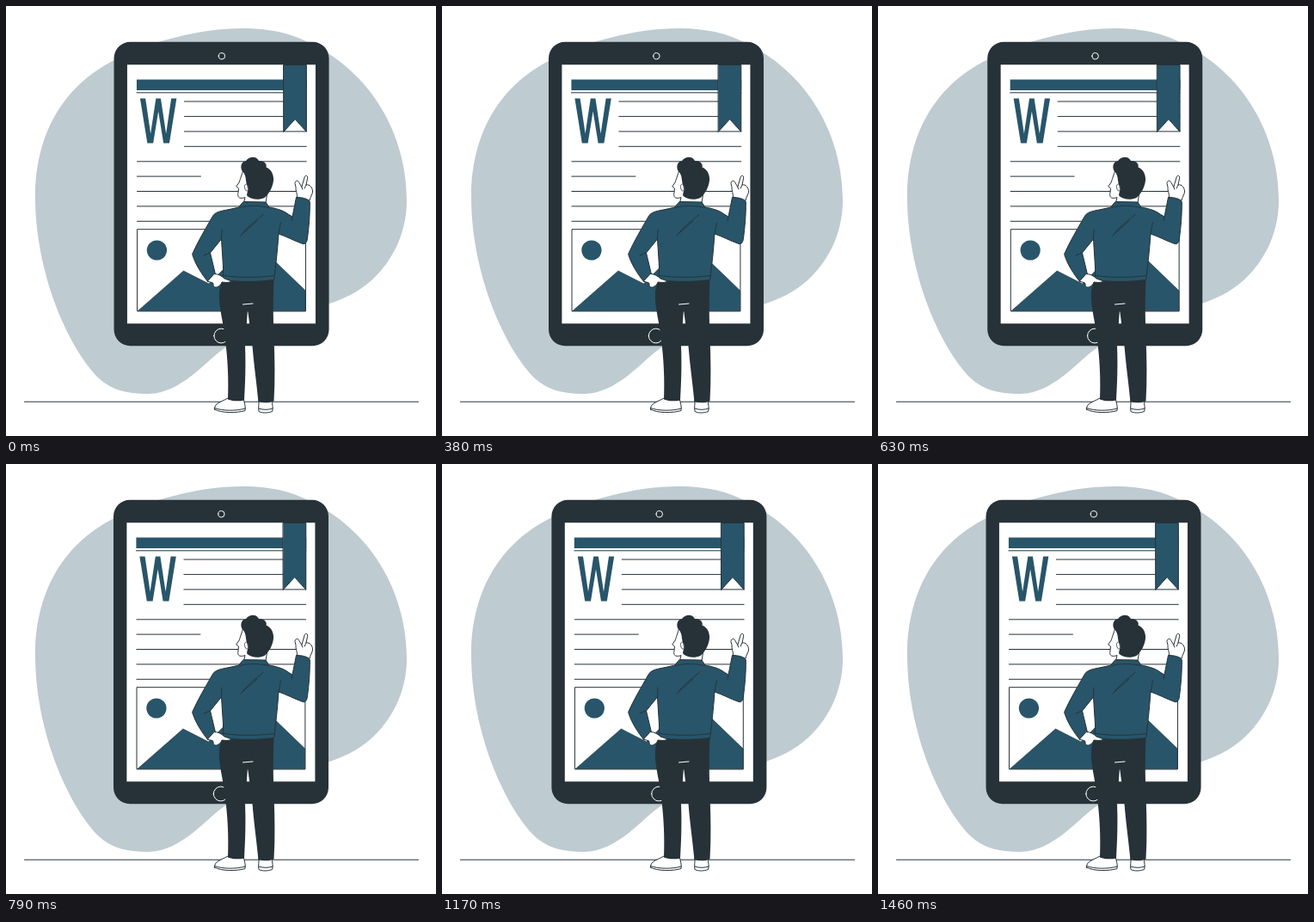
These frames come from a looping animation (500 by 500 pixels, 1.5 s). An HTML page with a canvas:

```html
<!DOCTYPE html>
<html lang="en">
<head>
<meta charset="utf-8">
<title>Reading on a tablet</title>
<style>
html, body { margin: 0; width: 100%; height: 100%; overflow: hidden; background: #fff; }
canvas { display: block; width: 500px; height: 500px; }
</style>
</head>
<body>
<canvas id="stage"></canvas>
<script>
const DARK = '#263238', TEAL = '#28556a', WHITE = '#fff', PALE = '#becbd1';
const LOOP = 1500, FRAMES = 36;
// Horizontal shake, one value per tenth of the loop.
const SHAKE = [0, -1, 2, -4, 4, -4, 4, -4, 2, -1, 0];

const canvas = document.getElementById('stage');
const ctx = canvas.getContext('2d');
const ratio = window.devicePixelRatio || 1;
canvas.width = canvas.height = 500 * ratio;
ctx.lineJoin = ctx.lineCap = 'round';

function shape(d, fill, stroke, width = 1) {
  const path = new Path2D(d);
  if (fill) { ctx.fillStyle = fill; ctx.fill(path); }
  if (stroke) { ctx.strokeStyle = stroke; ctx.lineWidth = width; ctx.stroke(path); }
}

function circle(x, y, r, fill, stroke) {
  shape(`M${x - r} ${y}a${r} ${r} 0 1 0 ${2 * r} 0a${r} ${r} 0 1 0 ${-2 * r} 0z`, fill, stroke);
}

const line = (x1, x2, y) => shape(`M${x1} ${y}H${x2}`, null, DARK);

function background() {
  ctx.fillStyle = WHITE;
  ctx.fillRect(0, 0, 500, 500);
  shape('M126 63C165 42 225 26 275 26C310 26 333 33 350 41.5C425 76 466 150 466 226' +
    'C466 268 446 300 425 319C409 333 392 341 375 346.5' +
    'C325 365 285 372 256 396.5C232 412 205 450.5 165 451C140 451 122 446 108 433' +
    'C72 397 34 310 34 222C34 155 62 95 126 63Z', PALE);
  line(21.5, 479.5, 460.2);
}

function tablet() {
  shape('M144.6 41.8H356.6A19 19 0 0 1 375.6 60.8V376.2A19 19 0 0 1 356.6 395.2H144.6A19 19 0 0 1 125.6 376.2V60.8A19 19 0 0 1 144.6 41.8Z', DARK);
  shape('M141 68.2H360V369.2H141Z', WHITE);
  circle(251, 58.2, 3.7, null, WHITE);
  circle(250.3, 383.5, 8.4, null, WHITE);

  shape('M152 85.5H349.8V98H152Z', TEAL);
  line(152, 349.5, 100.8);
  for (const y of [111, 128.4, 145.9, 163.3]) line(207.5, 349.3, y);
  for (const y of [180.8, 215.5, 232.9, 250.3]) line(152.5, 349.3, y);
  line(152.5, 226.5, 198.1);
  shape('M156 107.4h6.2l6 41 6.2-41h5.6l6.2 41 6-41h6.2l-8.4 52h-6.8l-6-37-6 37h-6.8z', TEAL);
  shape('M323 68.5H349.4V146.2L336.2 131.6L323 146.2Z', WHITE);
  shape('M323 68.5H349.4V146.2L336.2 131.6L323 146.2Z', TEAL, DARK);

  shape('M153 259.7H348.5V354.8H153Z', WHITE, DARK);
  circle(175.5, 284, 11.6, TEAL);
  shape('M153.5 354.5L206.5 308L236 323L287 272L348.3 331V354.5Z', TEAL, DARK, 0.6);
}

function legs() {
  shape('M242.5 469C242 462 249 461 258 456H276C277 461 279 466 278 470.5C268 473.5 250 473.5 242.5 469Z', WHITE, DARK);
  shape('M242.5 467.5C252 471 268 471 278 468', null, DARK);
  shape('M294 458H309C309.5 463 311 468 309.5 471.5C304 473.5 298 473.5 294 471.5C293 466 294.5 463 294 458Z', WHITE, DARK);
  shape('M294 468C299 469.8 305 469.8 310 468', null, DARK);
  shape('M251 319L311.5 317C310.5 340 310.5 360 311.5 385C312.5 410 313 435 311.5 459.5C306 462 299 461.5 293.5 460.5' +
    'C291 435 288 415 286.5 395L281 353L278 395C279 420 278 440 277 458.5C270 460 264 459.5 258 457.5' +
    'C259 435 258 410 254.5 385C252 362 245 343 249 326Z', DARK);
  shape('M275.5 347L287 346', null, WHITE);
}

function jacket() {
  shape('M270.5 234L276 227.5L302 228L306 234C315 235.5 323 238 328 242L333 245L337.5 222.5' +
    'C343 222.5 349 224 353.3 227.5C353.5 244 352 258 350.5 270C350 275 348 277.5 345 276.5C335 273 326 268 317 265' +
    'C315.5 286 313.5 304 311.5 318.5C292 321 271 321 252 318.5C252.5 313 252.5 307 252.5 303L250.5 271' +
    'L237.5 287L243.5 312L235 321C227 311 220 300 216.6 288.5C223 274 232 259 240 245C242 241 246 239.5 250 238.5Z',
    TEAL, DARK);
  const folds = [
    'M271 234.5C282 231.5 295 232 306 234.5',
    'M273 267.5C280 257 289 251 299 242.5', 'M276 264L292 250',
    'M237.5 287L230 290', 'M250.5 271L251 260',
    'M252.5 313.5C272 316 293 316 312 313.5',
    'M317 265L319.5 252', 'M333 245L332 250'
  ];
  for (const fold of folds) shape(fold, null, DARK, 0.9);
}

function hands() {
  shape('M234.5 320L242 311.5C247 311.5 251 314 254 317L262.5 320C259 322 255 321.5 251 321' +
    'C250 324 247 327.5 243 327C240 326 242 324 240.5 322Z', WHITE, DARK);
  shape('M338.5 222.5C339 218 336.5 215 337 210.5L336 206.5C336 202.5 340 202.5 341 205.5L343.8 210.5L347.2 199' +
    'C348.2 196 351.2 197.2 350.6 200.2L349 208C353 207 356.5 211 356.6 216C356 220 353.5 222 353 226.5C349 223.5 344 222.5 338.5 222.5Z',
    WHITE, DARK);
  shape('M343.8 210.5L344.8 213M349 208L347.2 212', null, DARK);
}

function head() {
  shape('M276 190C274 197 272 202 271.2 205L267.8 209.8L270.5 212L270 217C269 221 270.5 223.3 273 223.3' +
    'C275.5 223.5 276.5 223 278 222.5L276.5 229H302L304 216L298 192Z', WHITE, DARK);
  shape('M276.5 194C271.5 190 272.5 181 279 180C284 174 291.5 175 294 180C300 179.5 304 184 302.5 187.5' +
    'C309.5 190 312.5 199 310.5 206C309 213 305 219 300.5 223C294 226 285 225 280.5 221C279 218 283 214 281 209' +
    'C278 205 280 199 276.5 194Z', DARK);
  shape('M280 207C277 206.5 276.8 211 278.5 214C279.5 216 281.5 215 281.5 213Z', WHITE, DARK, 0.8);
}

function shakeAt(time) {
  const frame = Math.floor(time % LOOP * FRAMES / LOOP + 0.1) % FRAMES;
  const tenth = (frame + 0.2) / 35.4 * 10;
  const i = Math.floor(tenth);
  return SHAKE[i] + (SHAKE[i + 1] - SHAKE[i]) * (tenth - i);
}

function draw(time) {
  ctx.setTransform(ratio, 0, 0, ratio, 0, 0);
  background();
  ctx.save();
  ctx.translate(shakeAt(time), 0);
  tablet();
  ctx.restore();
  legs();
  head();
  jacket();
  hands();
}

let start;
function tick(now) {
  start ??= now;
  draw(Math.max(0, now - start));
  requestAnimationFrame(tick);
}
draw(0);
requestAnimationFrame(tick);
</script>
</body>
</html>
```
